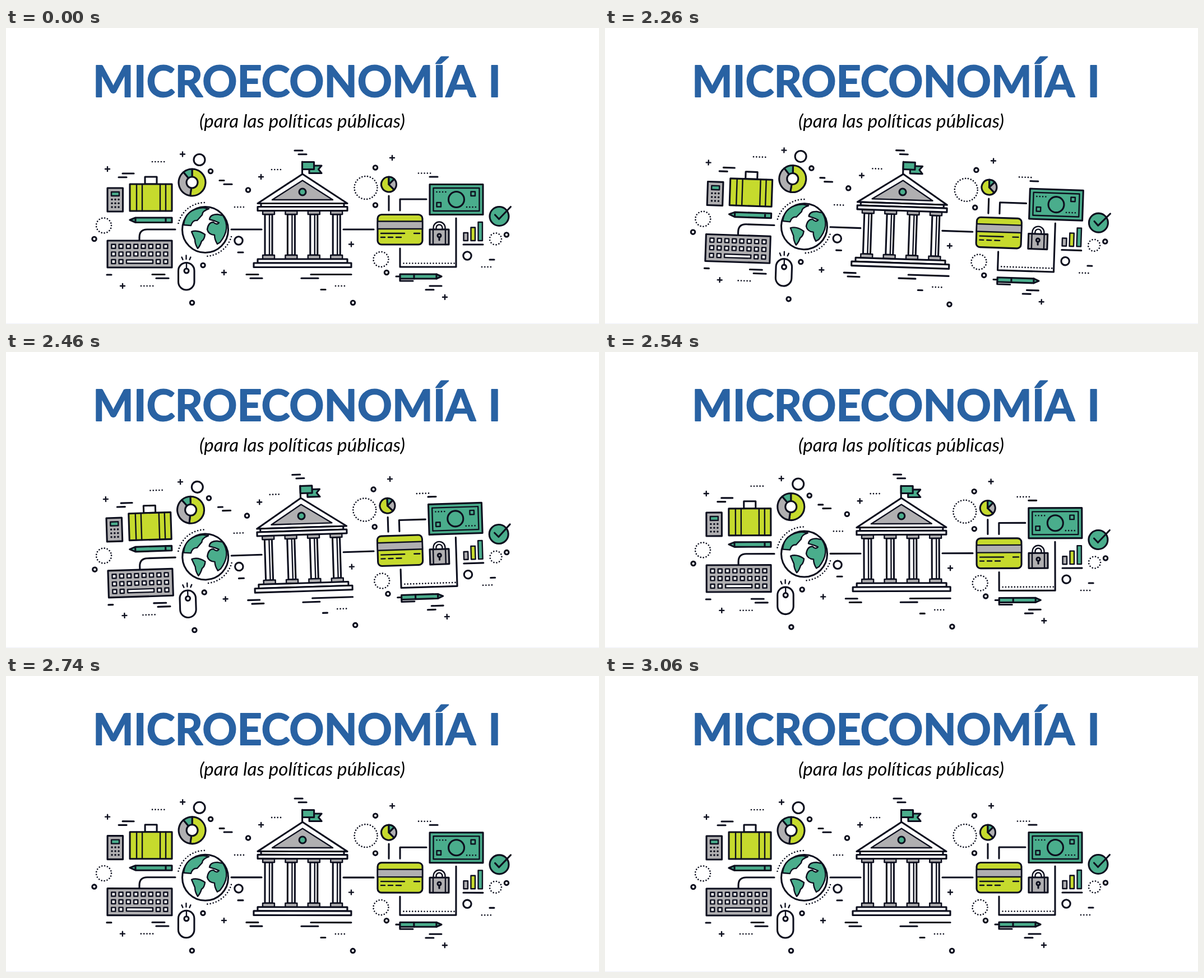
Recreate the animation shown at these times as an HTML page. Size 1058x529 px, loop 5.08 s.

```html
<!DOCTYPE html>
<html lang="es">
<head>
<meta charset="utf-8">
<title>Microeconomía I</title>
<style>
  html, body { margin: 0; width: 100%; height: 100%; overflow: hidden; background: #fff; }
  svg { display: block; }
  #title { font: 700 77px Lato, sans-serif; word-spacing: 6px; fill: #2962a3; stroke: #2962a3; stroke-width: 1.8; stroke-linejoin: round; }
  #subtitle { font: italic 400 33px Lato, sans-serif; letter-spacing: .1px; }
  #art { fill: none; stroke: #0d0f1e; stroke-width: 3.1; stroke-linecap: round; stroke-linejoin: round; }
</style>
</head>
<body>
<svg width="1058" height="529" viewBox="0 0 1058 529">
  <path d="M0 528.5H1058" stroke="#eef0fa"/>
  <text id="title" x="519" y="122.5" text-anchor="middle">MICROECONOMÍA I</text>
  <text id="subtitle" x="528.5" y="178" text-anchor="middle">(para las políticas públicas)</text>
  <g id="art"></g>
</svg>
<script>
const GREEN = '#4aad8c', LIME = '#c6da2d', GREY = '#b0afb1', INK = '#0d0f1e', WHITE = '#fff';
const THIN = 'stroke-width="2.4"';
const art = document.getElementById('art');
const parts = [];

// Basic shapes
const path = (d, fill = 'none', extra = '') => parts.push(`<path d="${d}" fill="${fill}" ${extra}/>`);
const circle = (x, y, r, fill = 'none', extra = '') =>
  parts.push(`<circle cx="${x}" cy="${y}" r="${r}" fill="${fill}" ${extra}/>`);
const rect = (x, y, w, h, fill = 'none', extra = '') =>
  parts.push(`<rect x="${x}" y="${y}" width="${w}" height="${h}" fill="${fill}" ${extra}/>`);
const centered = (x, y, w, h, fill, extra) => rect(x - w / 2, y, w, h, fill, extra);
const repeat = (n, draw) => { for (let i = 0; i < n; i++) draw(i); };

function wedge(x, y, r, from, to, fill) {
  const rim = deg => `${x + r * Math.cos(deg * Math.PI / 180)} ${y + r * Math.sin(deg * Math.PI / 180)}`;
  path(`M${x} ${y}L${rim(from)}A${r} ${r} 0 ${+(to - from > 180)} 1 ${rim(to)}Z`, fill);
}

// Small ornaments
const dotted = gap => `stroke-width="2.7" stroke-dasharray="0 ${gap}"`;
const dots = (x, y, n = 4) => path(`M${x} ${y}h${n * 5.3 - 5}`, 'none', dotted(5.3));
const dottedRing = (x, y, r) => circle(x, y, r, 'none', dotted(2 * Math.PI * r / Math.round(r * 1.26)));
const plus = (x, y) => path(`M${x - 4} ${y}h8M${x} ${y - 4}v8`, 'none', THIN);
const bead = (x, y) => circle(x, y, 3.7);
const dash = (x, y, w = 8) => path(`M${x} ${y}h${w}`);
const dashPair = (x, y, shift, w1 = 20, w2 = w1) => { dash(x, y, w1); dash(x + shift, y + 6.7, w2); };
const arrow = (d, x, y, turn) =>
  path(d) || parts.push(`<path d="M-6.5 -6.5L0 0L-6.5 6.5" transform="translate(${x} ${y}) rotate(${turn})"/>`);

function office() {
  rect(181, 286, 27.5, 42, GREY);
  rect(188, 293, 14, 7, GREEN, THIN);
  repeat(9, i => circle(189 + i % 3 * 6, 306.5 + Math.floor(i / 3) * 6.8, 1.8, INK, 'stroke="none"'));

  rect(248, 266, 21, 13, WHITE);
  rect(221, 279, 75, 48, LIME);
  for (const x of [233, 243, 275, 285]) path(`M${x} 279v48`, 'none', THIN);

  path('M221 343L231 339H296V347.5H231ZM231 339v8M285 339v8', GREEN);

  path('M238 379V374Q238 360 252 360H302');
  rect(181, 380, 115, 48, GREY);
  const isKey = (row, col) => row < 2 || col < 2 || col > 5;
  repeat(3, row => repeat(8, col => isKey(row, col) &&
    rect(188.3 + col * 13.3, 386.8 + row * 13.6, 7, 7, WHITE, THIN)));
  rect(215, 414.5, 47, 6, WHITE, THIN);

  rect(307.5, 419.5, 28.5, 48.5, WHITE, 'rx="14.2"');
  circle(322, 434, 4);
  path('M322 420v10M313.5 409.5l2 4.5M321.5 406.5v6.5M329.5 409.5l-2 4.5', 'none', THIN);

  plus(181, 252); plus(208, 461); plus(315, 225.5);
  bead(157.5, 377); bead(332, 491); bead(351.5, 424); bead(365, 256);
  circle(345, 235.5, 10);
  dottedRing(174.5, 353, 13.5);
  dots(261, 239, 5); dots(241, 461, 5);
  dashPair(208, 260, -7, 20, 14); dashPair(261, 440.5, 7, 22); dashPair(381, 272.5, 8, 8, 14);
  dash(180, 441);
}

function charts() {
  wedge(332, 276, 24, -90, 98, LIME);
  wedge(332, 276, 24, 98, 230, GREY);
  wedge(332, 276, 24, 230, 270, GREEN);
  circle(332, 276, 10, WHITE);

  wedge(683, 279.5, 13.5, 45, 270, LIME);
  wedge(683, 279.5, 13.5, -45, 45, GREY);
  wedge(683, 279.5, 13.5, -90, -45, GREEN);

  [GREY, LIME, GREEN].forEach((fill, i) => rect(816.5 + i * 13, 366 - i * 9.5, 7.5, 14 + i * 9.5, fill, THIN));
  dash(816, 387, 35);
}

function globe() {
  circle(355.5, 360.5, 41, WHITE);
  const land = d => path(d, GREEN, THIN);
  land('M317 352Q319 324 352 321L362 323Q350 327 350 334L341 344Q333 343 330 353Z');
  land('M331 364Q342 360 355 369Q354 378 349 381Q346 390 342 394Q337 386 337 378Z');
  land('M363 342Q364 333 377 333L387 335Q402 358 382 383L377 386Q372 378 372 370Q361 369 359 360Q361 347 370 347Q376 353 380 348L373 345Z');
  path('M307.5 349A49 49 0 0 1 354 312M402 373A49 49 0 0 1 357 408', 'none', dotted(5.3));
  circle(415, 380, 7.2);
  plus(389, 437);
  dash(414, 401, 9);
  dots(408, 320);
}

function bank() {
  const middle = 529;
  path('M528.5 239V262');
  path('M541 246h22l-5.5 6.5l5.5 7h-22Z', GREEN);
  rect(528.5, 239.5, 21, 13, GREEN);
  path('M529 261L449 313.5H609Z', WHITE);
  path('M529 272.5L475 307H583Z', GREY, THIN);
  circle(middle, 293, 6, GREEN);
  centered(middle, 313.5, 148, 6, WHITE);
  centered(middle, 319.5, 160, 7, WHITE);
  repeat(4, i => {
    const x = 468.5 + i * 40.4;
    centered(x, 333, 13, 73, WHITE);
    path(`M${x + 1.5} 333v73`, 'none', THIN);
    centered(x, 327, 21, 6, GREY, THIN);
    centered(x, 406, 21, 7, GREY, THIN);
  });
  centered(middle, 413, 160, 7, WHITE);
  centered(middle, 420, 174, 7.5, WHITE);

  plus(455, 266); plus(616, 386.5);
  bead(432, 289.5); bead(619, 491);
  dots(474, 253); dots(588, 461);
  dashPair(515, 219, 7, 14); dashPair(429, 440.5, 7, 21); dashPair(544, 440.5, -17, 72, 30);
  dash(562, 467.5);
}

function money() {
  rect(663, 333.5, 80, 53.5, LIME, 'rx="7"');
  rect(663, 345.5, 80, 13.5, GREY, THIN);
  path('M669 367H711M728 367H738M669 374H676M682 374H690M696 374H705', 'none', THIN);

  rect(756, 279.5, 95, 54, GREEN);
  rect(762.5, 286, 82, 41, 'none', THIN);
  circle(803.5, 306.5, 14);
  rect(768.5, 312, 7.5, 7.5, 'none', THIN);
  rect(829.5, 292.5, 7.5, 7.5, 'none', THIN);
  dots(768.5, 293);
  dots(822, 320);

  path('M762.5 360v-3a10.5 10.5 0 0 1 21 0v3h-5v-3a5.5 5.5 0 0 0 -11 0v3Z', WHITE, THIN);
  rect(756, 360, 34, 27, GREY);
  path('M762 360v27M784 360v27', 'none', THIN);
  circle(773, 371, 3, GREY);
  path('M773 374v5');

  circle(880, 336.5, 17, GREEN);
  path('M872.5 334L879.5 341.5L900.5 319.5');

  path('M703 440H768L777 444L768 448H703Z', GREEN);
  path('M696 444h7M703 448v4h23M728 440v8M768 440v8');

  plus(689, 232); plus(783, 481);
  bead(659, 249.5); bead(659, 316.5); bead(679, 437); bead(893, 369.5);
  circle(823, 407, 7.2);
  dottedRing(642, 285.5, 20.5); dottedRing(669, 413.5, 13.5); dottedRing(873.5, 377, 10.5);
  dots(736, 259.5, 5); dots(849, 427);
  dashPair(756, 461, -7, 21, 14);
  dash(756, 266, 14); dash(863, 414);
}

function arrows() {
  arrow('M402 360H456', 456.5, 360, 0);
  arrow('M602 360H656', 656.5, 360, 0);
  arrow('M683 326V300', 683, 299.5, -90);
  arrow('M703 326V306H750', 750.5, 306, 0);
  arrow('M803 340V427H703V394', 703, 393.5, -90);
  dots(709.5, 420.5, 18);
}

for (const draw of [arrows, office, charts, globe, bank, money]) draw();
art.innerHTML = parts.join('');

const LOOP = 5080, START = 2060, FRAME = 40, STEP = 41;

// Teeter in degrees: lean to 2 and hold, swing between 2 and -2, return to rest.
function tilt(t) {
  if (t < 200) return Math.min(t / 50, 2);
  if (t < 800) return 4 * Math.abs((t - 200) / 200 % 2 - 1) - 2;
  return Math.min(0, (t - 1000) / 100);
}

function render() {
  const step = Math.max(0, Math.floor((performance.now() % LOOP - START) / FRAME + .001));
  art.setAttribute('transform', `rotate(${tilt(step * STEP).toFixed(3)} 529 356)`);
  requestAnimationFrame(render);
}
render();
</script>
</body>
</html>
```
